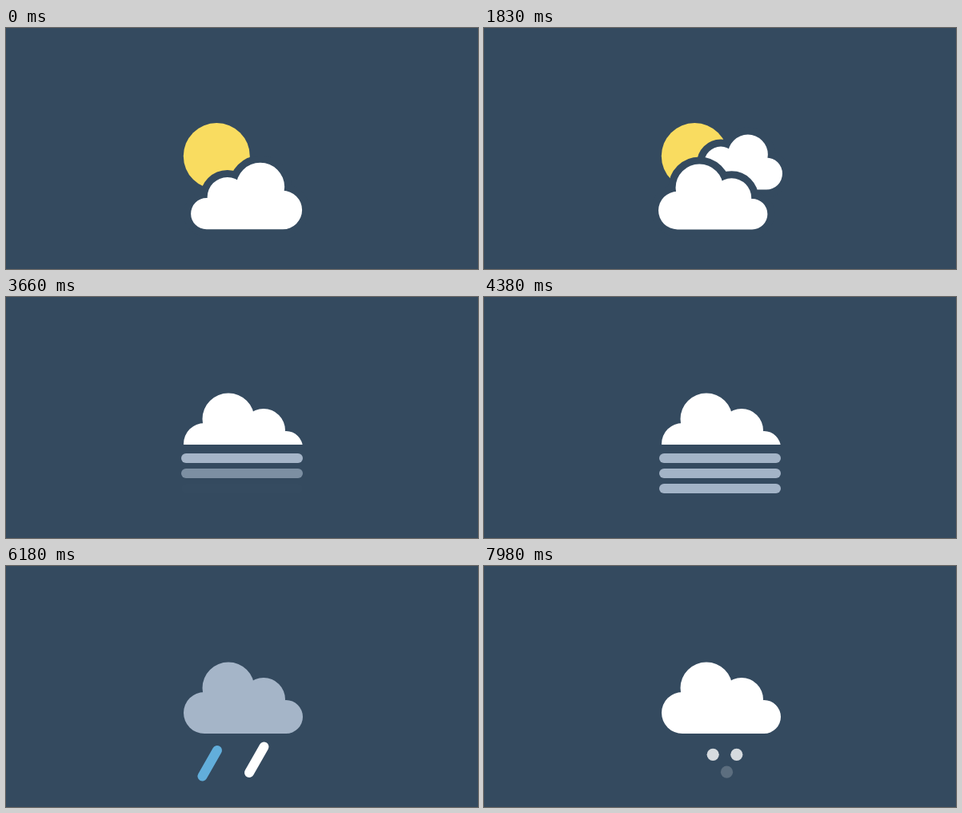
Animation of 590 by 302 pixels, one loop 8 s. Source, as an HTML page with a canvas:

```html
<!DOCTYPE html>
<html lang="en">
<head>
<meta charset="utf-8">
<title>Weather</title>
<style>
  html, body { margin: 0; width: 100%; height: 100%; overflow: hidden; background: #344a5f; }
  canvas { display: block; }
</style>
</head>
<body>
<canvas id="stage" width="590" height="302"></canvas>
<script>
const ctx = document.getElementById('stage').getContext('2d');
const LOOP = 8000, GAP = 9;
const SKY = '#344a5f', YELLOW = '#f9dc60', WHITE = '#fff', GREY = '#a5b5c8', BLUE = '#62aedb';

const clamp = p => Math.max(0, Math.min(1, p));
const span = (t, start, length) => clamp((t - start) / length);
const mix = (a, b, p) => a + (b - a) * p;
const smooth = p => p * p * (3 - 2 * p);
const backOut = (p, c = 1.7) => 1 + (c + 1) * (p - 1) ** 3 + c * (p - 1) ** 2;

// Lobes and body of a cloud 149 wide and 89.5 high
const W = 149, H = 89.5;
const shape = new Path2D();
for (const [x, y, r] of [[26, 63.5, 26], [56, 32.5, 32.5], [100, 46.5, 27], [128, 68.5, 21]]) {
  shape.moveTo(x + r, y);
  shape.arc(x, y, r, 0, 2 * Math.PI);
}
shape.rect(26, 50, 102, H - 50);

function cloud(x, y, s, { flip = false, color = WHITE, gap = GAP } = {}) {
  if (s <= 0.01) return;
  ctx.save();
  ctx.translate(flip ? x + W * s : x, y);
  ctx.scale(flip ? -s : s, s);
  if (gap) {
    ctx.strokeStyle = SKY;
    ctx.lineWidth = 2 * gap / s;
    ctx.stroke(shape);
  }
  ctx.fillStyle = color;
  ctx.fill(shape);
  ctx.restore();
}

function disc(x, y, r, color, alpha = 1) {
  ctx.globalAlpha = alpha;
  ctx.fillStyle = color;
  ctx.beginPath();
  ctx.arc(x, y, Math.max(0, r), 0, 2 * Math.PI);
  ctx.fill();
  ctx.globalAlpha = 1;
}

function sunAndClouds(t) {
  const out = span(t, 2280, 310);
  const size = out < 0.4 ? 1 + 0.2 * Math.sin(out / 0.8 * Math.PI) : 1.2 * (1 - smooth((out - 0.4) / 0.6));
  disc(263.3, 160.5, 41.5 * size, YELLOW);

  const join = smooth(span(t, 3150, 200));

  // Small cloud that takes the place of the sun
  const pop = t > 2580 ? backOut(span(t, 2580, 270)) : 0;
  const small = 0.57 * pop;
  cloud(232.5 + 42.5 * (1 - pop) + 11 * join, 122 + 25.5 * (1 - pop) + 11 * join, small, { gap: GAP * clamp(pop) });

  // Cloud that swings, swells and then moves to the back
  const swing = -49 * Math.sin(Math.PI * span(t, 630, 330));
  const swell = 1 + 0.155 * Math.sin(Math.PI * span(t, 960, 270));
  const away = smooth(span(t, 1500, 330));
  const s = mix(0.933, 0.77, away) * swell;
  const midX = mix(300.6, 315.6, away) + swing - 14 * join;
  const bottom = mix(252.3, 202.5, away) + 9 * join;
  cloud(midX - W * s / 2, bottom - H * s, s, { flip: true });

  // Front cloud
  const grow = smooth(span(t, 1500, 330));
  const f = mix(0.915, 1, join) * grow;
  cloud(mix(286.2, 296.5, join) - W * f / 2, mix(252.4, 210, join) - H * f, f, { gap: GAP * grow });
}

function bar(y, alpha) {
  ctx.globalAlpha = alpha;
  ctx.fillStyle = GREY;
  ctx.beginPath();
  ctx.roundRect(219, y, 152, 12, 6);
  ctx.fill();
  ctx.globalAlpha = 1;
}

function bolt(t) {
  const enter = span(t, 4400, 430), leave = span(t, 5130, 270);
  if (enter === 0 || leave === 1) return;
  ctx.save();
  ctx.translate(0, -58 * (1 - backOut(enter, 2.2)) + 28 * leave * leave);
  ctx.globalAlpha = 1 - leave;
  ctx.fillStyle = YELLOW;
  ctx.beginPath();
  for (const [x, y] of [[287, 218.5], [304, 218.5], [294, 235], [308.5, 235.5], [276, 270], [286, 245.5], [272.5, 245]]) ctx.lineTo(x, y);
  ctx.fill();
  ctx.restore();
}

function drop(x, color, p) {
  if (p <= 0 || p >= 1) return;
  const fall = -6 + 26 * p;
  ctx.globalAlpha = clamp(Math.min(p / 0.22, (1 - p) / 0.4));
  ctx.strokeStyle = color;
  ctx.lineWidth = 12;
  ctx.lineCap = 'round';
  ctx.beginPath();
  ctx.moveTo(x - fall * 0.57, 226.5 + fall);
  ctx.lineTo(x - 18.5 - fall * 0.57, 259 + fall);
  ctx.stroke();
  ctx.globalAlpha = 1;
}

function fogAndStorm(t) {
  const cut = smooth(span(t, 3350, 130)) - smooth(span(t, 4380, 150));
  const fogOut = 1 - span(t, 4380, 150);
  for (let i = 0; i < 3; i++) bar(196 + 19 * i, span(t, 3390 + 135 * i, 210) * fogOut);

  bolt(t);
  for (const start of [5440, 6012, 6640, 6940]) {
    drop(266.5, BLUE, span(t, start, 420));
    drop(322.5, WHITE, span(t, start + 72, 420));
  }

  const snow = 0.8 * span(t, 7660, 320);
  disc(286.2, 236.3, 7.6, WHITE, snow);
  disc(315.8, 236.3, 7.6, WHITE, snow);
  disc(303.5, 258.2, 7.6, WHITE, 0.2 * span(t, 7880, 100));

  const dark = span(t, 4380, 300) - span(t, 7440, 540);
  const color = `rgb(${mix(255, 165, dark)}, ${mix(255, 181, dark)}, ${mix(255, 200, dark)})`;
  ctx.save();
  ctx.beginPath();
  ctx.rect(0, 0, 590, 210 - 25 * cut);
  ctx.clip();
  cloud(222, 120.5, 1, { color, gap: 0 });
  ctx.restore();
}

function draw(now) {
  const t = now % LOOP;
  ctx.fillStyle = SKY;
  ctx.fillRect(0, 0, 590, 302);
  if (t < 3350) sunAndClouds(t);
  else fogAndStorm(t);
  requestAnimationFrame(draw);
}
requestAnimationFrame(draw);
</script>
</body>
</html>
```
